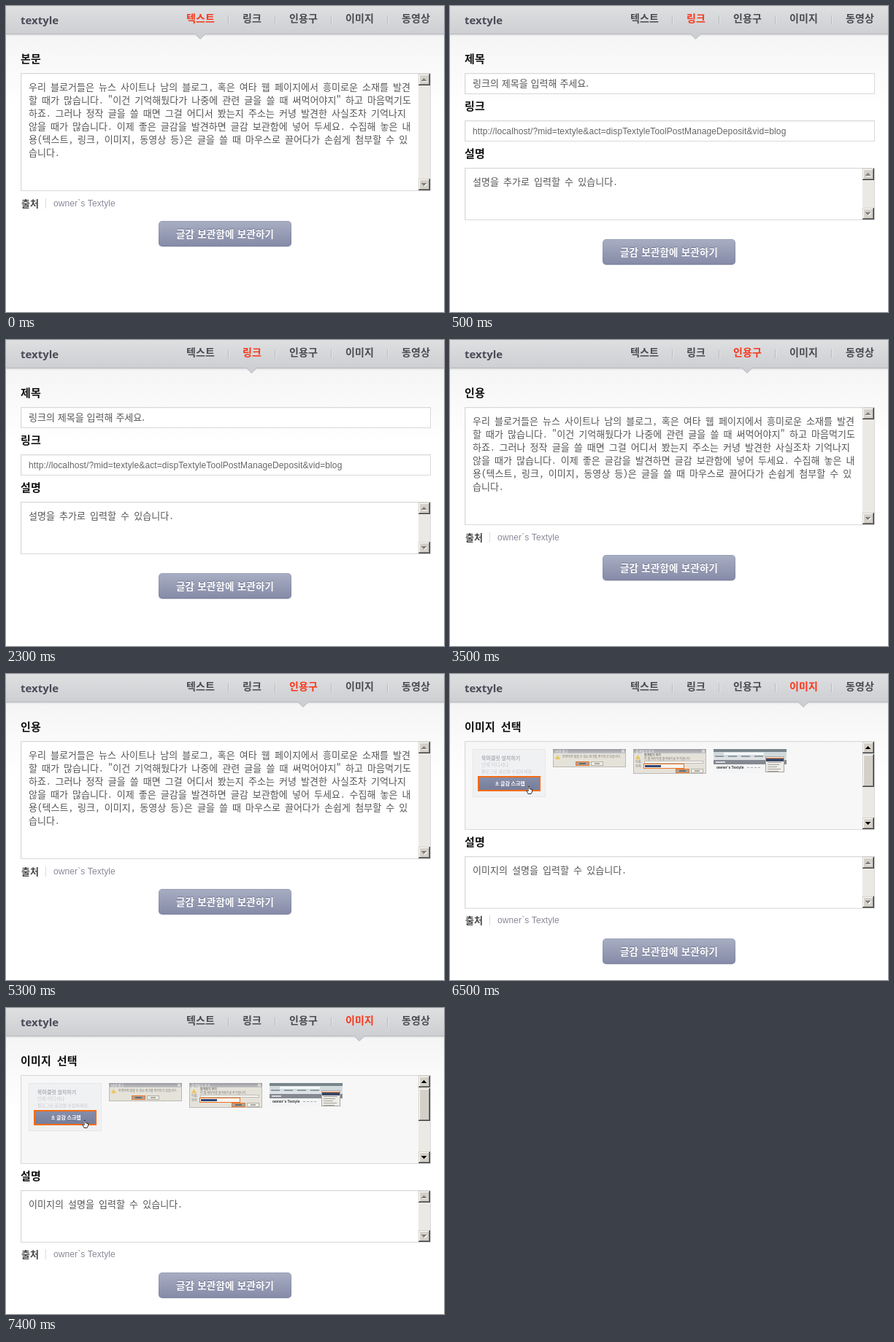
An HTML page with a canvas for the animation above (8 s loop, 600x420 px).

```html
<!DOCTYPE html>
<html lang="ko">
<head>
<meta charset="utf-8">
<title>글감 보관함</title>
<style>
html, body { margin: 0; width: 100%; height: 100%; overflow: hidden; background: #fff; }
canvas { display: block; }
</style>
</head>
<body>
<canvas id="stage" width="600" height="420"></canvas>
<script>
const ctx = document.getElementById('stage').getContext('2d');
const MONO = '"Noto Sans Mono CJK KR", "Noto Sans CJK KR", "Noto Sans CJK", monospace';
const KOREAN = '"Noto Sans CJK KR", "Noto Sans CJK", sans-serif';
const LATIN = '"Liberation Sans", Arial, sans-serif';

const LOOP = 8000;
const TABS = [
  { label: '텍스트', x: 247, tip: 266 },
  { label: '링크', x: 324, tip: 336.5 },
  { label: '인용구', x: 388, tip: 407 },
  { label: '이미지', x: 465, tip: 484 },
  { label: '동영상', x: 542, tip: 561 }
];
const ARTICLE = [
  '우리 블로거들은 뉴스 사이트나 남의 블로그, 혹은 여타 웹 페이지에서 흥미로운 소재를 발견',
  '할 때가 많습니다. "이건 기억해뒀다가 나중에 관련 글을 쓸 때 써먹어야지" 하고 마음먹기도',
  '하죠. 그러나 정작 글을 쓸 때면 그걸 어디서 봤는지 주소는 커녕 발견한 사실조차 기억나지',
  '않을 때가 많습니다. 이제 좋은 글감을 발견하면 글감 보관함에 넣어 두세요. 수집해 놓은 내',
  '용(텍스트, 링크, 이미지, 동영상 등)은 글을 쓸 때 마우스로 끌어다가 손쉽게 첨부할 수 있',
  '습니다.'
];
const BLOG = 'owner`s Textyle';
const URL_TEXT = 'http://localhost/?mid=textyle&act=dispTextyleToolPostManageDeposit&vid=blog';

function rect(x, y, w, h, fill) {
  ctx.fillStyle = fill;
  ctx.fillRect(x, y, w, h);
}

function frame(x, y, w, h, line, fill, width = 1) {
  rect(x, y, w, h, line);
  rect(x + width, y + width, w - 2 * width, h - 2 * width, fill);
}

function vertical(y0, y1, from, to) {
  const g = ctx.createLinearGradient(0, y0, 0, y1);
  g.addColorStop(0, from);
  g.addColorStop(1, to);
  return g;
}

function polygon(points, fill) {
  ctx.beginPath();
  points.forEach(([x, y]) => ctx.lineTo(x, y));
  ctx.closePath();
  ctx.fillStyle = fill;
  ctx.fill();
}

function rounded(x, y, w, h, r, fill) {
  ctx.beginPath();
  ctx.roundRect(x, y, w, h, r);
  ctx.fillStyle = fill;
  ctx.fill();
}

// cy is the vertical middle of the glyphs
function text(str, x, cy, { size = 13, weight = 400, family = MONO, color = '#555', align = 'left', spacing = 0, words = 0 } = {}) {
  ctx.font = `${weight} ${size}px ${family}`;
  ctx.letterSpacing = `${spacing}px`;
  ctx.wordSpacing = `${words}px`;
  ctx.textAlign = align;
  ctx.fillStyle = color;
  ctx.fillText(str, x, Math.round(cy + size * 0.37));
}

const latin = (str, x, cy, color) => text(str, x, cy, { size: 12, family: LATIN, color, spacing: 0.1 });
const heading = (str, cy) => text(str, 20, cy, { size: 15, weight: 700, color: '#111', spacing: 0.2 });

function header(active) {
  rect(0, 0, 600, 420, '#fff');
  rect(0, 39, 600, 102, vertical(39, 141, '#f5f5f6', '#ffffff'));
  rect(0, 0, 600, 38, vertical(0, 38, '#dedfe1', '#cecfd2'));
  rect(0, 38, 600, 1, '#b7b8bb');
  rect(0, 39, 600, 3, vertical(39, 42, '#dfe0e2', '#f5f5f6'));
  text('textyle', 20, 19, { size: 15, weight: 700, family: '"Open Sans", sans-serif', color: '#4b4b59' });
  TABS.forEach((tab, i) => {
    text(tab.label, tab.x, 17, { size: 14, weight: 700, color: i === active ? '#f8371b' : '#494b50', spacing: 0.1 });
    if (i) {
      const x = [304, 368, 445, 522][i - 1];
      rect(x, 13, 1, 12, '#b9babd');
      rect(x + 1, 13, 1, 12, '#e4e5e7');
    }
  });
  const tip = TABS[active].tip;
  polygon([[tip - 8, 38], [tip + 8, 38], [tip, 46]], '#bfc0c3');
  polygon([[tip - 7, 37.5], [tip + 7, 37.5], [tip, 44.5]], '#cecfd2');
}

function bevel(x, y, w, h) {
  rect(x, y, w, h, '#404040');
  rect(x, y, w - 1, h - 1, '#d4d0c8');
  rect(x + 1, y + 1, w - 2, h - 2, '#808080');
  rect(x + 1, y + 1, w - 3, h - 3, '#fff');
  rect(x + 2, y + 2, w - 4, h - 4, '#d4d0c8');
}

function arrow(x, y, down, color) {
  for (let i = 0; i < 4; i++) rect(x + 3 - i, y + (down ? 3 - i : i), 1 + 2 * i, 1, color);
}

function scrollbar(y, h, enabled) {
  rect(565, y, 16, h, '#ebe9e4');
  [y, y + h - 16].forEach((top, i) => {
    bevel(565, top, 16, 16);
    if (!enabled) arrow(570, top + 7, i === 1, '#fff');
    arrow(569, top + 6, i === 1, enabled ? '#000' : '#808080');
  });
  if (enabled) bevel(565, y + 17, 16, 45);
}

function box(y, h, fill = '#fff') {
  frame(20, y, 562, h, '#d9d9d9', '#f3f3f3');
  rect(22, y + 2, 559, h - 3, fill);
}

function textarea(y, h, lines) {
  box(y, h);
  scrollbar(y + 1, h - 2, false);
  lines.forEach((line, i) => text(line, 31, y + 19 + 18 * i, { spacing: 0.04, words: -0.5 }));
}

function origin(cy) {
  text('출처', 21, cy, { weight: 700, color: '#444' });
  rect(54, cy - 7, 1, 14, '#dcdcdc');
  latin(BLOG, 65, cy, '#8a8a9a');
}

function saveButton(y) {
  rounded(209, y + 1, 182, 35, 5, '#d9dbe2');
  rounded(209, y, 182, 35, 5, vertical(y, y + 35, '#9ba1b8', '#7a809d'));
  rounded(210, y + 1, 180, 33, 4, vertical(y, y + 35, '#a8aec2', '#858aa7'));
  const style = { size: 13.5, weight: 700, family: KOREAN, align: 'center', spacing: 0.15, words: 1 };
  text('글감 보관함에 보관하기', 300, y + 17, { ...style, color: '#6c718d' });
  text('글감 보관함에 보관하기', 300, y + 18, { ...style, color: '#fff' });
}

function bookmarkThumb() {
  frame(31, 103, 100, 66, '#e6e7e9', '#f0f1f3');
  const small = { size: 7, family: KOREAN };
  text('북마클릿 설치하기', 43, 115, { ...small, weight: 700, color: '#aeb0b6' });
  text('언제 어디서나', 43, 125, { ...small, size: 6.5, color: '#cbccd0' });
  text('블로그로 글감을 수집하세요.', 43, 134, { ...small, size: 6, color: '#c6c8cd' });
  frame(38, 140, 86, 21, '#f36c16', vertical(140, 161, '#8990ab', '#747b98'), 2);
  text('글감 스크랩', 69, 150, { ...small, weight: 700, color: '#fff' });
  rect(62, 152, 5, 1, '#dfe2ec');
  rect(64, 147, 1, 4, '#dfe2ec');
  polygon([[62, 149], [67, 149], [64.5, 152]], '#dfe2ec');
  polygon([[107, 154], [109, 154], [109, 157], [113, 158], [113, 162], [111, 165], [107, 165], [104, 160], [107, 160]], '#333');
  polygon([[107.6, 155], [108.4, 155], [108.6, 158], [112, 159], [112, 162], [110.5, 164], [107.5, 164], [105.3, 160.7], [107.6, 161]], '#fff');
}

function dialogThumb(x, h, title) {
  frame(x, 103, 100, h, '#bbb9b5', '#e5e2da');
  rect(x, 103, 100, 6, vertical(103, 109, '#999b9e', '#c1c2c4'));
  text(title, x + 3, 106, { size: 4.5, family: KOREAN, color: '#fff' });
  rect(x + 94, 104, 4, 4, '#d8d6d1');
  polygon([[x + 6.5, 111], [x + 10, 117], [x + 3, 117]], '#e9c65e');
}

function dialogButtons(x, y) {
  frame(x, y, 19, 6, '#ef7422', '#a9a49d');
  rect(x + 5, y + 2, 9, 2, '#6a6967');
  frame(x + 21, y, 17, 6, '#b5b1a9', '#eeece6');
  rect(x + 26, y + 2, 7, 2, '#aaa7a0');
}

function alertThumbs() {
  const tiny = { size: 4, family: KOREAN, color: '#77746f' };
  dialogThumb(141, 25, '보안 경고');
  text('안전하지 않을 수 있는 링크를 추가하고 있습니다.', 154, 114, tiny);
  dialogButtons(172, 120);

  dialogThumb(251, 34, '즐겨찾기 추가');
  text('즐겨찾기 추가', 266, 112, { ...tiny, weight: 700 });
  text('이 웹 페이지를 즐겨찾기로 추가합니다.', 266, 117, tiny);
  text('이름:', 254, 121, tiny);
  frame(266, 119, 81, 4, '#bdbab4', '#f8f7f4');
  text('위치:', 254, 127, tiny);
  frame(265, 123, 56, 7, '#ef7422', '#f6f5f1');
  rect(267, 125, 22, 3, '#2d4775');
  dialogButtons(309, 130);
}

function browserThumb() {
  rect(361, 103, 100, 33, '#f4f5f6');
  rect(361, 103, 100, 4, '#77858b');
  rect(361, 107, 100, 7, '#d1dadd');
  rect(375, 108, 55, 3, '#f5f7f8');
  for (let i = 0; i < 4; i++) rect(363 + 18 * i, 112, 12, 2, '#929da4');
  rect(361, 114, 100, 4, '#dfe2e4');
  rect(361, 118, 100, 6, '#858991');
  rect(364, 120, 13, 2, '#d4d6db');
  text(BLOG, 365, 128, { size: 5, weight: 700, family: LATIN, color: '#34363b' });
  for (let i = 0; i < 4; i++) rect(407 + 5 * i, 128, 3, 1, '#a9abb0');
  frame(432, 113, 26, 22, '#aaa69f', '#efede8');
  rect(433, 115, 24, 5, '#394765');
  rect(433, 115, 24, 1, '#e58142');
  for (let y = 121; y < 134; y += 3) rect(435, y, 12 + (y * 7) % 8, 1, '#a29f99');
}

function articlePage(active, title) {
  header(active);
  heading(title, 72);
  textarea(92, 162, ARTICLE);
  origin(271);
  saveButton(295);
}

function linkPage() {
  header(1);
  heading('제목', 72);
  box(92, 29);
  text('링크의 제목을 입력해 주세요.', 31, 106, { family: KOREAN, words: 1 });
  heading('링크', 137);
  box(157, 29);
  latin(URL_TEXT, 31, 171.5, '#666');
  heading('설명', 202);
  textarea(222, 72, ['설명을 추가로 입력할 수 있습니다.']);
  saveButton(320);
}

function imagePage() {
  header(3);
  heading('이미지 선택', 72);
  box(92, 122, '#f7f7f7');
  scrollbar(93, 120, true);
  bookmarkThumb();
  alertThumbs();
  browserThumb();
  heading('설명', 230);
  textarea(250, 72, ['이미지의 설명을 입력할 수 있습니다.']);
  origin(338);
  saveButton(363);
}

function draw(t) {
  if (t < 500) articlePage(0, '본문');
  else if (t < 3500) linkPage();
  else if (t < 6500) articlePage(2, '인용');
  else imagePage();
}

const start = performance.now();
function tick() {
  draw((performance.now() - start) % LOOP);
  requestAnimationFrame(tick);
}
tick();
</script>
</body>
</html>
```
